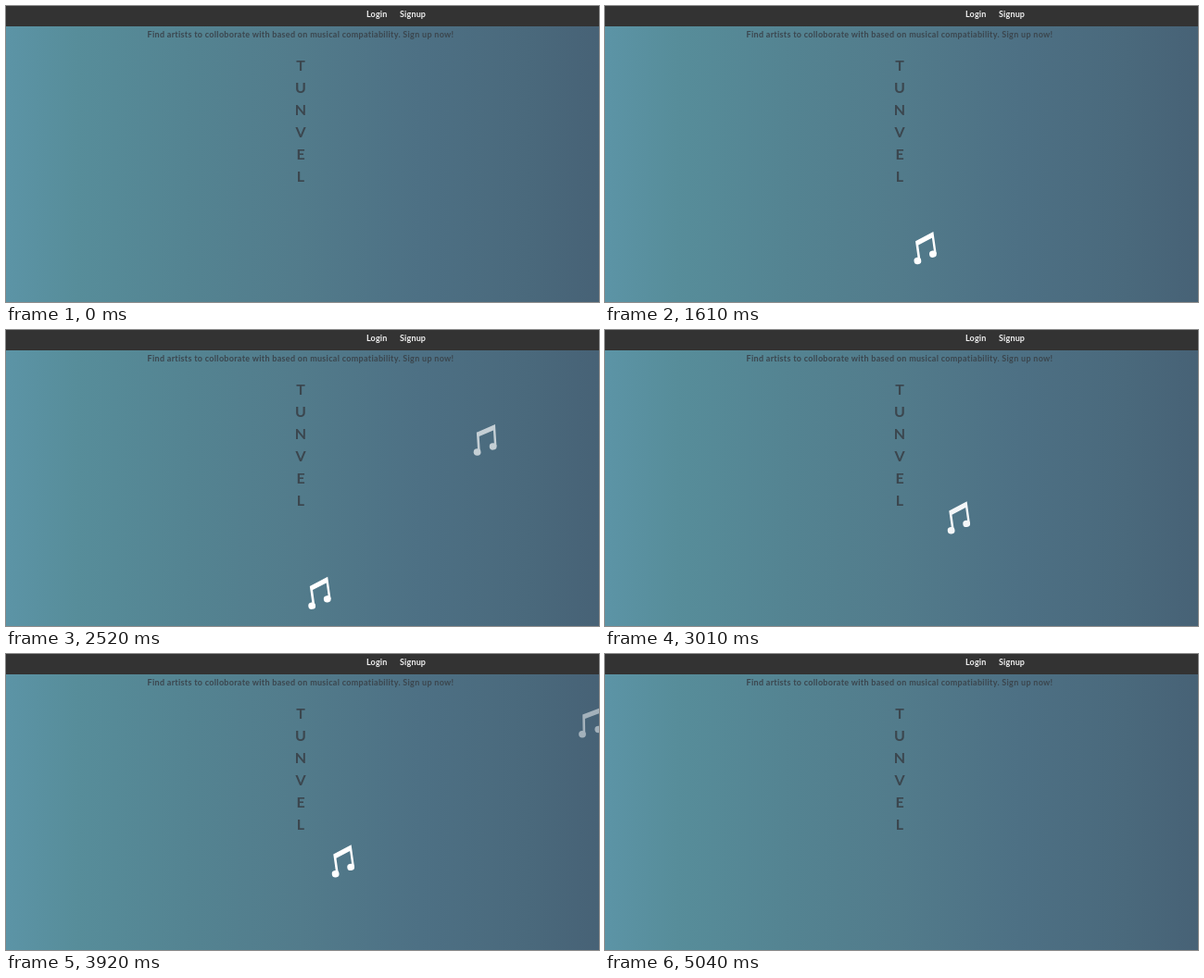
Write an HTML page that moves like this. It is 640 px wide and 320 px high and loops after 5.11 s.

```html
<!DOCTYPE html>
<html lang="en">
<head>
<meta charset="utf-8">
<title>Floating notes</title>
<style>
  html, body { margin: 0; width: 100%; height: 100%; overflow: hidden; }
  svg { display: block; width: 640px; height: 320px; }
  text { font-family: Lato, "Open Sans", sans-serif; font-weight: 700; }
  .nav { font-size: 9px; letter-spacing: .15px; fill: #f0f0f0; }
  .tagline { font-size: 9px; letter-spacing: .3px; fill: #3b464e; text-anchor: middle; }
  .brand text { font-size: 16px; fill: #3b464e; text-anchor: middle; }
</style>
</head>
<body>
<svg viewBox="0 0 640 320">
  <defs>
    <linearGradient id="sky">
      <stop offset="0" stop-color="#5c94a6"/>
      <stop offset=".12" stop-color="#578d9a"/>
      <stop offset=".3" stop-color="#548492"/>
      <stop offset=".5" stop-color="#527b8b"/>
      <stop offset=".7" stop-color="#4d7084"/>
      <stop offset=".88" stop-color="#4a697c"/>
      <stop offset="1" stop-color="#476276"/>
    </linearGradient>
    <g id="note" fill="#fff">
      <path d="M-8.6-8.7L12-16.2V8H9.6V-9.8L-6-4.2V12.5H-8.6Z"/>
      <ellipse cx="-9.2" cy="12.6" rx="3.9" ry="3.7"/>
      <ellipse cx="8.2" cy="7.6" rx="3.9" ry="3.7"/>
    </g>
  </defs>
  <rect width="640" height="320" fill="url(#sky)"/>
  <rect width="640" height="22" fill="#333"/>
  <text class="nav" x="389" y="12.3">Login</text>
  <text class="nav" x="425" y="12.3">Signup</text>
  <text class="tagline" x="318" y="34">Find artists to colloborate with based on musical compatiability. Sign up now!</text>
  <g class="brand" id="brand"></g>
  <g id="notes"></g>
</svg>
<script>
const LOOP = 5110, STEP = 70;
const LAUNCHES = [1250, 2300, 3332];

// age in ms, x, y, tilt, opacity
const FLIGHT = [
  [0, 332, 320, -8, 1],
  [500, 352.5, 239, -8, 1],
  [588, 363, 224, -8, 1],
  [710, 381, 203, -8, .94],
  [780, 394, 191, -8, .9],
  [1060, 461, 145, -5.5, .76],
  [1218, 501, 125.5, -4, .7],
  [1620, 631, 74, -1, .5],
  [1720, 668, 64, 0, .45]
];

const svgEl = (name, attrs, parent) => {
  const el = document.createElementNS("http://www.w3.org/2000/svg", name);
  for (const key in attrs) el.setAttribute(key, attrs[key]);
  return parent.appendChild(el);
};

const brand = document.getElementById("brand");
[..."TUNVEL"].forEach((letter, i) => {
  svgEl("text", { x: 318, y: 70.2 + 24 * i }, brand).textContent = letter;
});

const layer = document.getElementById("notes");
const notes = LAUNCHES.map(() => svgEl("use", { href: "#note", visibility: "hidden" }, layer));

function slope(i, col) {
  const a = FLIGHT[Math.max(i - 1, 0)];
  const b = FLIGHT[Math.min(i + 1, FLIGHT.length - 1)];
  return i === 0 && col === 1 ? 0 : (b[col] - a[col]) / (b[0] - a[0]);
}

// Smooth cubic through the flight points
function sample(age, col) {
  const i = FLIGHT.findIndex(p => p[0] > age) - 1;
  const p = FLIGHT[i], q = FLIGHT[i + 1];
  const span = q[0] - p[0], u = (age - p[0]) / span, v = 1 - u;
  return v * v * (1 + 2 * u) * p[col] + u * u * (1 + 2 * v) * q[col]
    + span * u * v * (v * slope(i, col) - u * slope(i + 1, col));
}

function draw(time) {
  const end = FLIGHT[FLIGHT.length - 1][0];
  notes.forEach((note, i) => {
    const age = time - LAUNCHES[i];
    const flying = age >= 0 && age < end;
    note.setAttribute("visibility", flying ? "visible" : "hidden");
    if (!flying) return;
    const [x, y, tilt, alpha] = [1, 2, 3, 4].map(col => sample(age, col));
    note.setAttribute("transform", `translate(${x} ${y}) rotate(${tilt})`);
    note.setAttribute("opacity", Math.min(alpha, 1));
  });
}

const start = performance.now();
function tick() {
  const t = (performance.now() - start) % LOOP;
  draw(Math.floor(t / STEP) * STEP);
  requestAnimationFrame(tick);
}
tick();
</script>
</body>
</html>
```
